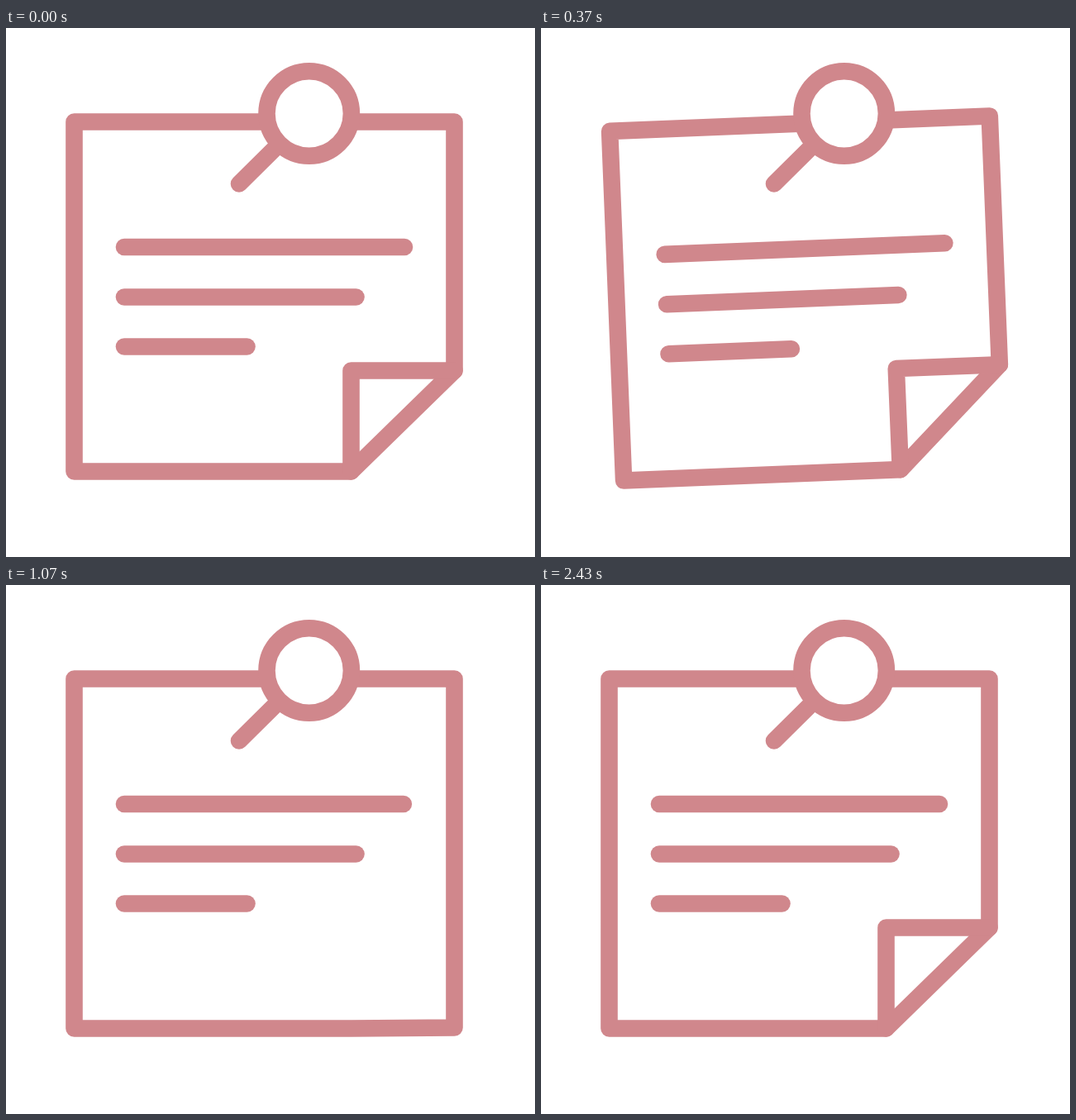
An HTML page with a canvas for the animation above (2500 ms loop, 640x640 px).

```html
<!DOCTYPE html>
<html lang="en">
<head>
<meta charset="utf-8">
<title>Pinned note</title>
<style>
  html, body { margin: 0; width: 100%; height: 100%; overflow: hidden; background: #fff; }
  canvas { display: block; }
</style>
</head>
<body>
<canvas id="stage" width="640" height="640"></canvas>
<script>
const ctx = document.getElementById('stage').getContext('2d');
const LOOP = 2500, FPS = 30, STEPS = 75;
const PIN = [366.7, 103.5];
const RIGHT = [542.5, 414.5], BOTTOM = [417.5, 536.5];
const FOLDED = [417.5, 414.5], LIFTED = [407, 399], FLAT = [542.5, 535.5];

// y, left, right, erase start, duration, delay of the rewriting stroke
const LINES = [
  [265, 143, 482, 15, 13, 4.44],
  [325.5, 143, 423.5, 15, 10.1, 3.86],
  [385.5, 143, 291.5, 15, 13.1, 3.48]
];

const progress = (f, from, to) => Math.min(1, Math.max(0, (f - from) / (to - from)));
const smooth = u => u * u * (3 - 2 * u);
const ease = (f, from, to) => smooth(progress(f, from, to));
const mix = (a, b, p) => a + (b - a) * p;
const mixPoint = (a, b, p) => [mix(a[0], b[0], p), mix(a[1], b[1], p)];

function stroke(points, closed) {
  ctx.beginPath();
  points.forEach(p => ctx.lineTo(...p));
  if (closed) ctx.closePath();
  ctx.stroke();
}

// Swing in degrees, clockwise first, then a smaller one back
function swing(f) {
  if (f < 5) return 3.3 * ease(f, 1, 5);
  if (f < 11) return mix(3.3, -2.3, ease(f, 5, 11));
  return -2.3 * (1 - ease(f, 11, 15));
}

function flapCorner(f) {
  if (f < 18.5) return mixPoint(FOLDED, LIFTED, ease(f, 10.4, 18.5));
  if (f < 61) return mixPoint(LIFTED, FLAT, ease(f, 18.5, 32));
  const u = progress(f, 61, 73);
  return mixPoint(FLAT, FOLDED, mix(u, smooth(u), 0.6));
}

function drawLine(f, [y, left, right, start, time, delay]) {
  const erased = ease(f, start, start + time);
  const written = ease(f, start + delay, start + delay + time);
  if (erased < 1) stroke([[mix(left, right, erased), y], [right, y]]);
  if (written > 0) stroke([[left, y], [mix(left, right, written), y]]);
}

function drawNote(f) {
  const corner = flapCorner(f);
  const outline = [BOTTOM, [82.5, 536.5], [82.5, 113.5], [542.5, 113.5], RIGHT];
  const side = (corner[0] - RIGHT[0]) * (BOTTOM[1] - RIGHT[1])
             - (corner[1] - RIGHT[1]) * (BOTTOM[0] - RIGHT[0]);
  if (side < 0) {
    // Still folded: the crease is the note's edge
    stroke(outline, true);
    stroke([RIGHT, corner, BOTTOM]);
  } else {
    stroke([...outline, corner], true);
  }
  LINES.forEach(line => drawLine(f, line));
}

function drawPin() {
  stroke([[282, 188.5], [330, 141]]);
  ctx.beginPath();
  ctx.arc(...PIN, 51.2, 0, 2 * Math.PI);
  ctx.fill();
  ctx.stroke();
}

function draw(now) {
  const f = Math.floor((now % LOOP) * FPS / 1000 + 0.15) % STEPS;
  ctx.fillStyle = '#fff';
  ctx.fillRect(0, 0, 640, 640);
  ctx.strokeStyle = '#d0878c';
  ctx.lineWidth = 20.6;
  ctx.lineCap = ctx.lineJoin = 'round';

  ctx.save();
  ctx.translate(...PIN);
  ctx.rotate(swing(f) * Math.PI / 180);
  ctx.translate(-PIN[0], -PIN[1]);
  drawNote(f);
  ctx.restore();
  drawPin();
}

const begin = performance.now();
function tick() {
  draw(performance.now() - begin);
  requestAnimationFrame(tick);
}
tick();
</script>
</body>
</html>
```
